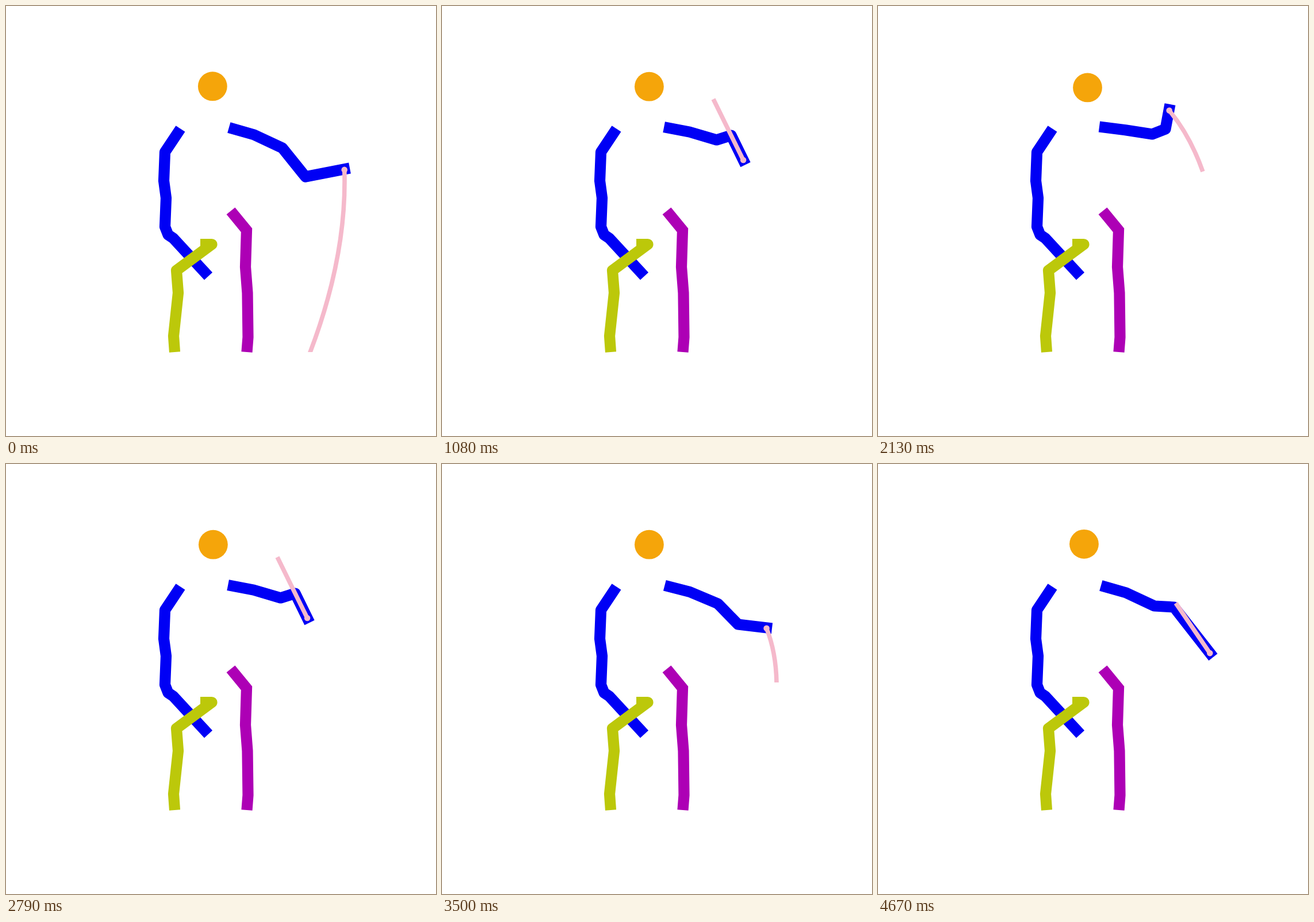
An HTML page for the animation above (4710 ms loop, 748 by 748 pixels).

```html
<!DOCTYPE html>
<html lang="en">
<head>
<meta charset="utf-8">
<title>String trick</title>
<style>
  html, body { margin: 0; width: 100%; height: 100%; overflow: hidden; background: #fff; }
  svg { display: block; width: 100vw; height: 100vh; }
  polyline, path { fill: none; stroke-width: 19.2; stroke-linejoin: round; }
  .blue { stroke: #0000f5; }
  .olive { stroke: #bcc80a; }
  .purple { stroke: #ad00b5; stroke-linejoin: miter; }
  #head { fill: #f5a50a; }
  #cord { stroke: #f5b9cb; stroke-width: 7.6; }
  #knot { fill: #f5b9cb; }
</style>
</head>
<body>
<svg viewBox="0 0 748 748">
  <defs><clipPath id="floor"><rect width="748" height="602"/></clipPath></defs>
  <circle id="head" r="25.4"/>
  <polyline class="blue" points="303.5,213.5 276.5,254 274.5,304 278.5,334 276.5,384 282,398 291,404 352,470"/>
  <polyline class="olive" points="338,414.5 358,414.5 296.5,460 299.5,499 291.5,574 293.5,602"/>
  <polyline class="purple" points="391,356.5 418.5,390 416.5,454 420,499 421,576 419,602"/>
  <polyline id="arm" class="blue"/>
  <g clip-path="url(#floor)">
    <path id="cord"/>
    <circle id="knot" r="5.3"/>
  </g>
</svg>
<script>
const LOOP = 4710, FPS = 24, CYCLE = 41, OFFSET = 15;

// Key poses of one throw, times in steps of 1/24 s
const poses = [
  { at: 0,  droop: 233, elbow: [503, 225], hand: [528, 276], tip: [472, 162], bend: 0 },
  { at: 4,  droop: 247, elbow: [515, 249], hand: [583, 336], tip: [518, 242], bend: 0 },
  { at: 9,  droop: 248, elbow: [520, 272], hand: [590, 318], tip: [585, 525], bend: 0.06 },
  { at: 15, droop: 247, elbow: [521, 297], hand: [598, 282], tip: [584, 420], bend: 0.1 },
  { at: 17, droop: 243, elbow: [515, 279], hand: [574, 286], tip: [582, 380], bend: 0.09 },
  { at: 25, droop: 223, elbow: [500, 214], hand: [508, 171], tip: [565, 288], bend: 0.09 },
  { at: 32, droop: 216, elbow: [489, 191], hand: [463, 152], tip: [496, 167], bend: 1 }
].map(({ at, ...parts }) => ({ at, v: Object.values(parts).flat() }));

const $ = id => document.getElementById(id);
const set = (id, attrs) => {
  for (const name in attrs) $(id).setAttribute(name, attrs[name]);
};

function poseAt(i) {
  const turn = Math.floor(i / poses.length);
  const { at, v } = poses[i - turn * poses.length];
  return { at: at + turn * CYCLE, v };
}

// Smooth cyclic curve through the poses, without overshoot
function sample(phase) {
  const i = poses.findLastIndex(p => p.at <= phase);
  const [p, a, b, q] = [-1, 0, 1, 2].map(d => poseAt(i + d));
  const h = b.at - a.at, u = (phase - a.at) / h;
  const rate = (s, e, j) => (e.v[j] - s.v[j]) / (e.at - s.at);
  const slope = (x, y) => x * y > 0 ? 2 * x * y / (x + y) : 0;
  return a.v.map((start, j) => {
    const mid = rate(a, b, j), d = b.v[j] - start;
    const m0 = slope(rate(p, a, j), mid) * h, m1 = slope(mid, rate(b, q, j)) * h;
    return start + u * (m0 + u * (3 * d - 2 * m0 - m1 + u * (m0 + m1 - 2 * d)));
  });
}

// The upper arm follows from how far it droops
function upperArm(y) {
  const low = y - 215;
  return [384 + low * 0.12, 209.5 + low * 0.06,
          430 + low * 0.04, 213 + low * 0.34,
          477 + Math.max(0, y - 230) * 0.22, y];
}

function draw(ms) {
  const frame = Math.floor((ms % LOOP + 5) * FPS / 1000);
  const phase = (frame + OFFSET) % CYCLE;
  const [droop, ex, ey, hx, hy, tipX, tipY, bend] = sample(phase);

  const sway = 3.8 * Math.cos((phase - 8.5) / CYCLE * 2 * Math.PI);
  set("head", { cx: 361.4 - sway, cy: 140.6 - sway * 0.43 });
  set("arm", { points: [...upperArm(droop), ex, ey, hx, hy].join(" ") });

  // The cord hangs just short of the hand's end and starts the loop fully let out
  const grip = 10 / Math.hypot(ex - hx, ey - hy);
  const kx = hx + (ex - hx) * grip + 0.5, ky = hy + (ey - hy) * grip + 1;
  const slack = Math.max(0, 1 - frame / 2);
  const dx = tipX - 56 * slack - kx, dy = tipY + 185 * slack - ky;
  const along = (1 - bend) / 2;
  const cx = kx + dx * along + dy * bend, cy = ky + dy * along - dx * bend;
  set("cord", { d: `M${kx},${ky}Q${cx},${cy} ${kx + dx},${ky + dy}` });
  set("knot", { cx: kx, cy: ky });
}

const begin = performance.now();
function tick() {
  draw(performance.now() - begin);
  requestAnimationFrame(tick);
}
tick();
</script>
</body>
</html>
```
